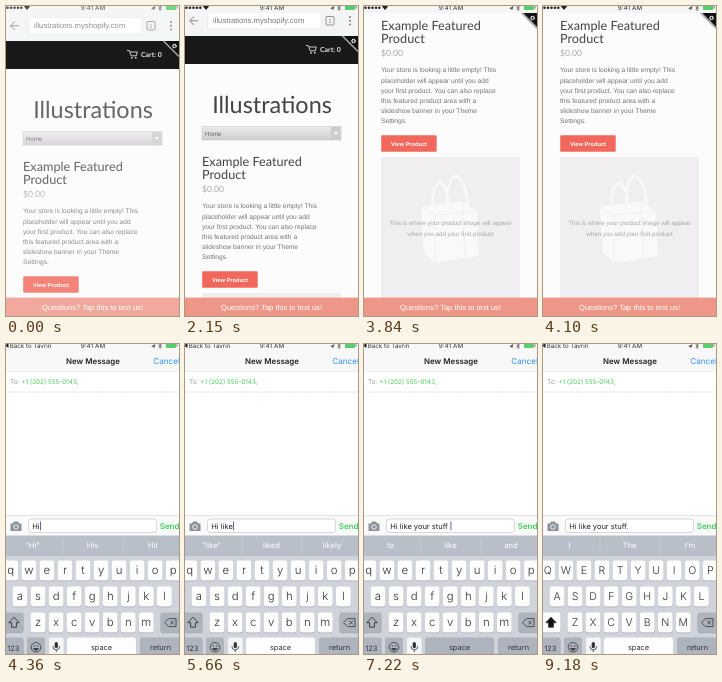
An HTML page that plays this animation: 173x310 px, repeating every 9.31 s.

```html
<!DOCTYPE html>
<html lang="en">
<head>
<meta charset="utf-8">
<title>Text us from the shop</title>
<style>
  html, body { margin: 0; width: 100%; height: 100%; overflow: hidden; background: #fff; }
  svg { display: block; width: 100%; height: 100%; }
  text { white-space: pre; text-rendering: geometricPrecision; }
  .ui { font-family: Inter, Roboto, sans-serif; }
  .body { font-family: "Liberation Sans", sans-serif; }
  .head { font-family: Lato, sans-serif; }
  .mid { text-anchor: middle; }
  .bold { font-weight: 600; }
  .letter { font-weight: 300; }
</style>
</head>
<body>
<svg id="stage" viewBox="0 0 173 310" preserveAspectRatio="none"></svg>
<script>
const LOOP = 9310, STEP = 130, START = 2150, CHAT = 4230, CAPS = 7480;
const BAR = 28; // how far the browser toolbar slides away

const rect = (x, y, w, h, fill, extra = '') =>
  `<rect x="${x}" y="${y}" width="${w}" height="${h}" fill="${fill}" ${extra}/>`;
const circle = (x, y, r, fill, extra = '') =>
  `<circle cx="${x}" cy="${y}" r="${r}" fill="${fill}" ${extra}/>`;
const text = (x, y, size, fill, str, cls = 'ui', extra = '') =>
  `<text x="${x}" y="${y}" font-size="${size}" fill="${fill}" class="${cls}" ${extra}>${str}</text>`;
const path = (d, fill, extra = '') => `<path d="${d}" fill="${fill}" ${extra}/>`;
const line = (d, color, width = 1, extra = '') =>
  path(d, 'none', `stroke="${color}" stroke-width="${width}" ${extra}`);

// Shop page
const copy = [
  'Your store is looking a little empty! This',
  'placeholder will appear until you add',
  'your first product. You can also replace',
  'this featured product area with a',
  'slideshow banner in your Theme',
  'Settings.'
];

const bag = `<g id="bag">` +
  path('M57 342L98 336L113 346L115 391L71 398L60 388Z', '#faf8fa') +
  line('M98 336L101 392M57 342L71 350L113 346M71 350L71 398', '#efecef', .8) +
  line('M69 344C66 316 81 306 85 338M83 340C82 303 100 300 104 341', '#faf8fa', 2.4) + '</g>';

// A dome of small pale dots, spread by the golden angle
const posy = `<g id="posy">${Array.from({ length: 60 }, (_, i) => {
  const r = Math.sqrt(i / 60) * 18, a = i * 2.4;
  return circle(87 + r * Math.cos(a), 347 + r * Math.sin(a), 1.7, '#faf8fa');
}).join('')}</g>`;

const page = `<g id="page">
  ${rect(0, 35, 173, 28, '#191919')}
  ${line('M121 44.5h2.3l1.8 5.3h5.2l1-3.8h-7.2', '#ddd', .9)}
  ${circle(126, 51.8, .9, '#ddd')}${circle(129.8, 51.8, .9, '#ddd')}
  ${text(135, 51.3, 6.9, '#e6e6e6', 'Cart: 0', 'head', 'font-weight="700"')}
  ${text(87, 112, 23.4, '#444', 'Illustrations', 'head mid')}
  ${rect(17, 125.5, 139, 13.5, 'url(#select)', 'stroke="#c9c6c9" stroke-width=".6"')}
  ${text(20, 134.7, 6.2, '#666', 'Home', 'body')}
  ${rect(146, 126, 9.5, 12.5, '#cfcccf')}
  ${path('M149 131h4l-2 3z', '#fff')}
  ${text(17, 164.8, 12.7, '#444', 'Example Featured', 'head')}
  ${text(17, 178.3, 12.7, '#444', 'Product', 'head')}
  ${text(17, 191, 8.6, '#aaa', '$0.00', 'head')}
  ${copy.map((s, i) => text(17, 207.4 + i * 10.2, 6.67, '#747474', s, 'body')).join('')}
  ${rect(17.2, 270.3, 55.5, 16.5, '#f2685c', 'rx="1"')}
  ${text(45, 280.7, 5.7, '#fff', 'View Product', 'body mid', 'font-weight="700"')}
  ${rect(17, 292, 139, 170, '#f1eef1')}
  ${posy}${bag}
  ${text(86.5, 360.2, 6.2, '#aaa6aa', 'This is where your product image will appear', 'body mid')}
  ${text(86.5, 370.6, 6.2, '#aaa6aa', 'when you add your first product', 'body mid')}
</g>`;

const toolbar = `<g id="toolbar">
  ${path('M159 35H173V49Z', '#111')}
  ${line('M157.5 35L173 50.5', '#aaa', 1.4)}
  ${circle(168.5, 40, 1.6, 'none', 'stroke="#fff" stroke-width="1.4" stroke-dasharray="1 .4"')}
  ${rect(0, 0, 173, 35, '#f2f5f4')}
  ${rect(23, 11.5, 113, 16.5, '#fff', 'rx="1.5" stroke="#e2e2e2" stroke-width=".6"')}
  ${line('M9 15.5L4.5 19.8L9 24M5 19.8h8', '#888', 1)}
  ${text(28, 22.4, 7.7, '#777', 'illustrations.myshopify.com', 'body')}
  ${rect(141, 15.5, 8, 8.5, 'none', 'rx="1" stroke="#888" stroke-width=".9"')}
  ${text(145, 22, 6, '#888', '1', 'body mid')}
  ${[16, 19.7, 23.4].map(y => circle(165, y, 1, '#777')).join('')}
</g>`;

const banner =
  rect(0, 291.6, 173, 18.4, '#ee9688') +
  text(86.5, 304, 7.55, '#fff', 'Questions? Tap this to text us!', 'body mid');

const statusIcons =
  text(87, 4.4, 6.4, '#333', '9:41 AM', 'ui mid') +
  path('M145 2.5L149.5 0L148 4.5L147.3 2.7Z', '#444') +
  line('M152.5 .5l3 2.6l-1.5 1.5v-5l1.5 1.2l-3 2.6', '#444', .6) +
  rect(160, -1, 10, 5, '#58cf6c', 'rx=".8"') + rect(170.6, .5, .9, 2, '#444');

const shopStatus = rect(0, 0, 173, 7, '#f5f5f5') + statusIcons +
  [1.5, 5, 8.5, 12, 15.3].map(x => circle(x, 1.8, 1.3, '#222')).join('') +
  path('M18 .5Q21 -1.5 24 .5L21 4Z', '#222');

const veil = `<g id="veil" opacity=".18">${rect(0, 0, 173, 35, '#fff')}${rect(0, 63, 173, 247, '#fff')}</g>`;

// Message screen
const PITCH = 18.05, FUNC = '#adb4be', WHITE = '#fdfdfd';
const key = (cx, y, w, fill = WHITE, id = '') =>
  rect(cx - w / 2, y + .7, w, 20, '#a3a8b1', 'rx="2.4"') +
  rect(cx - w / 2, y, w, 20, fill, `rx="2.4" ${id}`);
const rows = [['qwertyuiop', 4.8, 216.5], ['asdfghjkl', 14, 242.5], ['zxcvbnm', 32, 268.5]];
const letters = rows.map(([chars, x0, y]) => [...chars].map((c, i) => {
  const x = x0 + i * PITCH;
  return key(x, y, 14.8) + text(x, y + 13.8, 11.4, '#333', c, 'ui mid letter');
}).join('')).join('');

const keyboard = rect(0, 212, 173, 98, '#d0d4da') + letters +
  key(7, 268.5, 21, FUNC, 'id="shiftKey"') +
  path('M8 273.2L13.2 278.7H10.4V283.2H5.6V278.7H2.8Z', 'none',
    'id="shiftArrow" stroke="#333" stroke-width=".9" stroke-linejoin="round"') +
  key(165, 268.5, 21, FUNC) +
  path('M158.5 278.6L162.5 274.6H170V282.6H162.5Z', 'none', 'stroke="#444" stroke-width=".9"') +
  line('M164.3 276.7l3.6 3.8m0-3.8l-3.6 3.8', '#444', .9) +
  key(7.5, 293.5, 20, FUNC) + text(7.2, 306.6, 7.4, '#333', '123', 'ui mid') +
  key(30, 293.5, 18, FUNC) +
  circle(30, 303.3, 4.8, 'none', 'stroke="#444" stroke-width=".9"') +
  circle(28.3, 302, .7, '#444') + circle(31.7, 302, .7, '#444') +
  path('M27 304h6q-.6 2.8-3 2.8t-3-2.8z', '#444') +
  key(50.3, 293.5, 15, '#f4f5f7') +
  rect(48.7, 298, 3.2, 6.2, '#333', 'rx="1.6"') +
  line('M46.9 302.2q0 3.7 3.4 3.7t3.4-3.7M50.3 306v2.2', '#333', .8) +
  key(95.5, 293.5, 69, WHITE, 'id="spaceKey"') + text(95.5, 306, 7.4, '#333', 'space', 'ui mid') +
  key(155, 293.5, 42, FUNC) + text(154.5, 306, 7.4, '#333', 'return', 'ui mid');

const chat = `<g id="chat">
  ${rect(0, 0, 173, 310, '#fff')}
  ${rect(0, 0, 173, 27.5, '#f8f8f8')}
  ${line('M0 27.5H173', '#e6e6e8', .6)}
  ${path('M2.5 -1V4L-1 1.5Z', '#222')}
  ${text(3.8, 4.2, 6.2, '#333', 'Back to Tavrin')}
  ${statusIcons}
  ${text(87, 19.6, 7.9, '#222', 'New Message', 'ui mid bold')}
  ${text(147.3, 19.6, 8.1, '#2f92f5', 'Cancel')}
  ${text(4, 39.6, 6.6, '#9a9a9f', 'To:')}
  ${text(15.3, 39.6, 6.35, '#46cf58', '+1 (202) 555-0143,')}
  ${line('M0 48H173', '#cfcfd2', .8, 'stroke-dasharray="1.2 1"')}
  ${rect(0, 171, 173, 20.5, '#fafafa')}
  ${line('M0 171.5H173', '#d4d4d7', .6)}
  ${path('M4.5 179.5h2.3l1.4-2h3.6l1.4 2h2.3v7.5h-11z', '#8b9199')}
  ${circle(10, 183, 2.3, 'none', 'stroke="#fff" stroke-width=".9"')}
  ${rect(22.5, 175, 128, 13.5, '#fff', 'rx="3" stroke="#c8c8cc" stroke-width=".7"')}
  ${text(26.3, 184.5, 7.5, '#222', '', 'ui', 'id="draft"')}
  ${rect(0, 177.5, .9, 8.8, '#4a5a80', 'id="caret"')}
  ${text(153.7, 184.8, 8, '#43cf5b', 'Send', 'ui bold')}
  ${rect(0, 191.5, 173, 20.5, '#b8bfc8')}
  ${line('M57 193.5V210M117 193.5V210', '#c9ced6', .7)}
  ${[26.5, 86.5, 147].map(x => text(x, 204.4, 7.7, '#fff', '', 'ui mid hint')).join('')}
  ${keyboard}
</g>`;

const $ = id => document.getElementById(id);
$('stage').innerHTML = `<defs><linearGradient id="select" x2="0" y2="1">
  <stop stop-color="#eceaec"/><stop offset="1" stop-color="#d0cdd0"/></linearGradient></defs>
  <g id="shop">${rect(0, 0, 173, 310, '#fcfcfc')}${page}${toolbar}${banner}${shopStatus}${veil}</g>${chat}`;

// [time, page offset]
const scroll = [[0, 0], [2020, 0], [2150, 5], [2540, 40], [2930, 82], [3320, 117], [3580, 133], [3840, 141], [LOOP, 141]];

// [time, typed text, suggestions]
const typing = [
  [4230, 'H', '“H”|He|Hi'],
  [4360, 'Hi', '“Hi”|His|Hit'],
  [4750, 'Hi ', 'I|there|how'],
  [4880, 'Hi l', '“l”|love|like'],
  [5140, 'Hi li', '“li”|like|little'],
  [5270, 'Hi lik', '“lik”|like|liked'],
  [5530, 'Hi like', '“like”|liked|likely'],
  [5790, 'Hi like ', 'the|a|I'],
  [5920, 'Hi like y', '“y”|you|your'],
  [6050, 'Hi like yo', '“yo”|you|your'],
  [6180, 'Hi like you', '“you”|your|you’re'],
  [6310, 'Hi like your', '“your”|you’re|yours'],
  [6440, 'Hi like your ', 'own|life|new'],
  [6570, 'Hi like your s', '“s”|so|she'],
  [6700, 'Hi like your st', '“st”|still|stuff'],
  [6830, 'Hi like your stu', '“stu”|stuff|stupid'],
  [6960, 'Hi like your stuf', '“stuf”|stuff|stuffed'],
  [7090, 'Hi like your stuff', '“stuff”|stuffed|stuffing'],
  [7220, 'Hi like your stuff ', 'to|like|and'],
  [CAPS, 'Hi like your stuff. ', 'I|The|I’m']
];

const hints = document.querySelectorAll('.hint');
const keys = document.querySelectorAll('.letter');
const caretHidden = t => (t >= 8390 && t < 8650) || t >= 9050;

function offsetAt(t) {
  const i = scroll.findIndex(([time]) => time > t);
  const [t0, a] = scroll[i - 1], [t1, b] = scroll[i];
  return a + (b - a) * (t - t0) / (t1 - t0);
}

function setCaps(on) {
  keys.forEach(k => {
    k.textContent = on ? k.textContent.toUpperCase() : k.textContent.toLowerCase();
    k.setAttribute('font-size', on ? 10.6 : 11.4);
  });
  $('shiftKey').setAttribute('fill', on ? WHITE : FUNC);
  $('shiftArrow').setAttribute('fill', on ? '#111' : 'none');
}

let shown = null;
function drawChat(t) {
  const entry = typing.filter(([time]) => time <= t).pop();
  const [typedAt, draft, words] = entry;
  if (entry !== shown) {
    shown = entry;
    $('draft').textContent = draft;
    words.split('|').forEach((word, i) => hints[i].textContent = word);
    $('caret').setAttribute('x', 26.7 + $('draft').getComputedTextLength());
    setCaps(t >= CAPS);
  }
  const spaceDown = draft.endsWith(' ') && t < typedAt + STEP;
  $('spaceKey').setAttribute('fill', spaceDown ? FUNC : WHITE);
  $('caret').setAttribute('opacity', caretHidden(t) ? 0 : 1);
}

function drawShop(t) {
  const held = t < START ? 0 : START + Math.floor((t - START) / STEP) * STEP;
  const y = offsetAt(held);
  const swap = Math.min(1, Math.max(0, (held - 2930) / 520));
  $('page').setAttribute('transform', `translate(0 ${-y})`);
  $('toolbar').setAttribute('transform', `translate(0 ${-Math.min(y, BAR)})`);
  $('posy').setAttribute('opacity', 1 - swap);
  $('bag').setAttribute('opacity', swap);
  $('veil').style.display = t < STEP ? '' : 'none';
}

const began = performance.now();
function frame() {
  const t = (performance.now() - began) % LOOP;
  const chatting = t >= CHAT;
  $('chat').style.display = chatting ? '' : 'none';
  $('shop').style.display = chatting ? 'none' : '';
  (chatting ? drawChat : drawShop)(t);
  requestAnimationFrame(frame);
}
frame();
</script>
</body>
</html>
```
